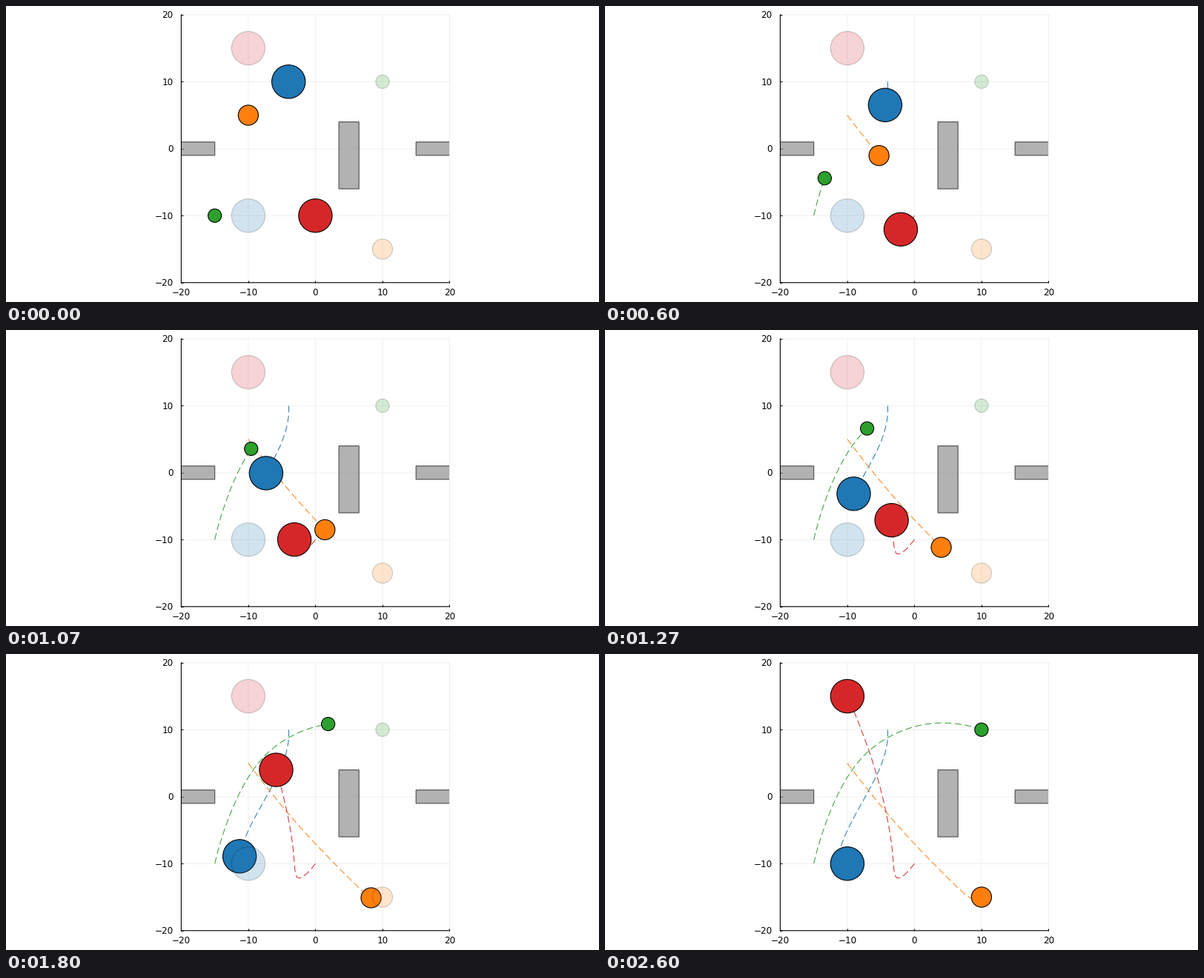
Animation of 800x400 px, one loop 2.67 s. Source, as a matplotlib script:

```python
import numpy as np
import matplotlib.pyplot as plt
from matplotlib.animation import FuncAnimation
from matplotlib.patches import Circle, Rectangle

W, H, DPI = 800, 400, 100
LOOP_MS, TICK_MS = 2670, 10
STEPS = 40               # poses per loop, 15 per second
PX = 72 / DPI            # one pixel in points
UNIT = 362 / 40          # pixels per data unit
TICKS = range(-20, 21, 10)

# steps at which every body passes its key points
KEYS = np.array([0, 12, 19, 27, 39])

# colour, radius, key points
BODIES = [
    ("#1f77b4", 2.5, [(-4, 10), (-5.25, 4), (-9.05, -3.15), (-11.3, -8.9), (-10, -10)]),
    ("#ff7f0e", 1.5, [(-10, 5), (-2.45, -4.35), (4, -11.15), (8.3, -15.1), (10, -15)]),
    ("#2ca02c", 1.0, [(-15, -10), (-12.05, -1.05), (-7.05, 6.6), (1.9, 10.85), (10, 10)]),
    ("#d62728", 2.5, [(0, -10), (-2.75, -12), (-3.4, -7.1), (-5.85, 4), (-10, 15)]),
]

# left, bottom, width, height; the outer walls run on past the view
WALLS = [(-25, -1, 10, 2), (3.5, -6, 3, 10), (15, -1, 10, 2)]


def smooth_path(points):
    """Cubic spline through the key points, at rest at both ends."""
    p = np.array(points, float)
    h = np.diff(KEYS)
    d = np.diff(p, axis=0) / h[:, None]
    n = len(KEYS)
    a, b = np.eye(n), np.zeros((n, 2))
    for i in range(1, n - 1):
        l, r = 1 / h[i - 1], 1 / h[i]
        a[i, i - 1:i + 2] = l, 2 * (l + r), r
        b[i] = 3 * (d[i - 1] * l + d[i] * r)
    m = np.linalg.solve(a, b)

    k = np.arange(STEPS)
    i = np.clip(np.searchsorted(KEYS, k, side="right") - 1, 0, n - 2)
    s = ((k - KEYS[i]) / h[i])[:, None]
    hi = h[i][:, None]
    return ((1 + 2 * s) * (1 - s) ** 2 * p[i] + s * (1 - s) ** 2 * hi * m[i]
            + s ** 2 * (3 - 2 * s) * p[i + 1] + s ** 2 * (s - 1) * hi * m[i + 1])


def add_disc(pos, radius, color, alpha, z):
    return ax.add_patch(Circle(pos, radius, fc=color, ec="black", alpha=alpha,
                               lw=1.1 * PX, zorder=z))


def draw_axes():
    ax.set(xlim=(-20, 20), ylim=(-20, 20), xticks=TICKS, yticks=TICKS)
    ax.set_axisbelow(True)
    ax.grid(color="black", alpha=0.06, lw=PX)
    for line in ax.get_xgridlines() + ax.get_ygridlines():
        line.set_clip_on(False)
    ax.tick_params(direction="in", length=3 * PX, width=PX,
                   labelbottom=False, labelleft=False)
    for side in ("top", "right"):
        ax.spines[side].set_visible(False)
    for side in ("left", "bottom"):
        ax.spines[side].set_linewidth(1.1 * PX)
    font = dict(family="DejaVu Sans", size=12 * PX, va="baseline")
    for v in TICKS:
        label = str(v).replace("-", "\u2212")
        ax.text(v, -20 - 17.4 / UNIT, label, ha="center", **font)
        ax.text(-20 - 11 / UNIT, v - 4.4 / UNIT, label, ha="right", **font)


plt.rcParams["path.snap"] = False
fig = plt.figure(figsize=(W / DPI, H / DPI), dpi=DPI, facecolor="white")
ax = fig.add_axes([236.4 / W, 26.2 / H, 362 / W, 362 / H])
draw_axes()

for x, y, w, h in WALLS:
    ax.add_patch(Rectangle((x, y), w, h, fc="gray", ec="black", alpha=0.6,
                           lw=1.2 * PX, zorder=2))

movers = []
for color, radius, points in BODIES:
    path = smooth_path(points)
    trail, = ax.plot([], [], color=color, lw=PX, dashes=(9, 4.5),
                     dash_capstyle="butt", zorder=3)
    disc = add_disc(path[0], radius, color, 1, 4)
    add_disc(path[-1], radius, color, 0.2, 5)
    movers.append((path, trail, disc))


def update(tick):
    # 15 poses per second, each starting at the nearest 10 ms tick
    k = (3 * tick + 1) // 20
    for path, trail, disc in movers:
        trail.set_data(path[:k + 1, 0], path[:k + 1, 1])
        disc.center = path[k]
    return []


anim = FuncAnimation(fig, update, frames=LOOP_MS // TICK_MS,
                     init_func=lambda: update(0), interval=TICK_MS,
                     repeat=True, repeat_delay=0, blit=False)
plt.show()
```
